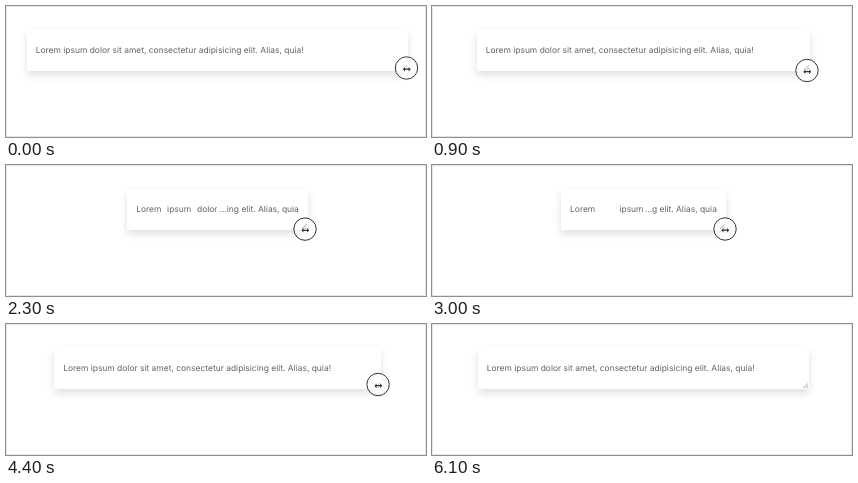
An HTML page for the animation above (6.2 s loop, 420 by 131 pixels).

```html
<!DOCTYPE html>
<html lang="en">
<head>
<meta charset="utf-8">
<title>Middle ellipsis</title>
<style>
  html, body { margin: 0; width: 100%; height: 100%; overflow: hidden; background: #fff; }
  #stage { position: absolute; left: 0; top: 0; width: 420px; height: 131px; overflow: hidden; }
  #stage::after { content: ""; position: absolute; inset: 0; border: 1px solid #e5e5e5; }
  #card {
    position: absolute; top: 24px; height: 41px; box-sizing: border-box; padding: 12px 9px 10px;
    background: #fff; border-radius: 2px; box-shadow: 0 4px 8px rgba(0, 0, 0, .13);
    font: 8.45px/18px Inter, "Open Sans", sans-serif; color: #626262; text-rendering: geometricPrecision;
  }
  #head, #tail { height: 18px; overflow: hidden; }
  #head { width: 50%; float: left; text-align: justify; }
  #tail { width: 50%; float: right; direction: rtl; white-space: nowrap; text-overflow: ellipsis; }
  .full #head { width: 100%; text-align: left; white-space: nowrap; }
  .full #tail { display: none; }
  svg { position: absolute; left: 0; top: 0; }
</style>
</head>
<body>
<div id="stage">
  <div id="card"><div id="head"></div><div id="tail"></div></div>
  <svg width="420" height="131" viewBox="0 0 420 131">
    <circle id="ring" r="11.2" fill="#fff" fill-opacity=".6" stroke="#333" stroke-width="1"/>
    <path id="grip" d="M-5.5 -1L-.8 -5.7M-2.8 -1L-.8 -3" stroke="#777" stroke-width=".7" fill="none"/>
    <path id="resize" d="M-4 0L-1.8 -2.2V-.6H1.8V-2.2L4 0L1.8 2.2V.6H-1.8V2.2Z"
      fill="#333" stroke="#fff" stroke-width=".8" paint-order="stroke"/>
    <path id="arrow" d="M0 0V9L2.1 7.1L3.5 10.3L5 9.6L3.6 6.5H6.4Z"
      fill="#222" stroke="#fff" stroke-width=".7"/>
  </svg>
</div>
<script>
const LOOP = 6200, STEP = 100;
const RELEASE = 5700, LEAVE = 5900, GONE = 6100;
const CENTER = 211.5, FULL_WIDTH = 268, LAG = 30;
const TEXT = "Lorem ipsum dolor sit amet, consectetur adipisicing elit. Alias, quia!";

// Turning points of the pointer: [time, position]
const DRAG_X = [[0, 400.5], [2820, 290], [4300, 374], [5000, 335], [5500, 375.5]];
const DRAG_Y = [[0, 62], [900, 64.5], [3000, 64], [3800, 60], [5000, 61], [5500, 65]];

const el = id => document.getElementById(id);
const mix = (a, b, k) => a + (b - a) * k;
const swing = k => (1 - Math.cos(Math.PI * k)) / 2;
const move = (id, x, y) => el(id).setAttribute("transform", `translate(${x} ${y})`);
const show = (id, on) => el(id).setAttribute("visibility", on ? "visible" : "hidden");

function track(keys, t) {
  const next = keys.findIndex(key => key[0] > t);
  if (next < 0) return keys[keys.length - 1][1];
  if (next === 0) return keys[0][1];
  const [t0, a] = keys[next - 1], [t1, b] = keys[next];
  return mix(a, b, swing((t - t0) / (t1 - t0)));
}

function drawCard(right) {
  const width = 2 * (right - CENTER);
  const card = el("card");
  card.style.left = right - width + "px";
  card.style.width = width + "px";
  card.className = width - 18 >= FULL_WIDTH ? "full" : "";
  move("grip", right - .5, 65);
}

function draw(time) {
  const t = Math.floor(time % LOOP / STEP) * STEP;
  const x = track(DRAG_X, t), y = track(DRAG_Y, t);

  // The card edge trails the pointer slightly
  drawCard(track(DRAG_X, t - LAG) + 1.8);
  move("ring", x, y);
  move("resize", x + .3, y + 1.2);
  const k = (t - LEAVE) / STEP;
  move("arrow", mix(384, 398, k), mix(84, 106, k));

  show("ring", t < RELEASE);
  show("resize", t < LEAVE);
  show("arrow", t >= LEAVE && t < GONE);
}

el("head").textContent = el("tail").textContent = TEXT;
const start = performance.now();
function tick() {
  draw(performance.now() - start);
  requestAnimationFrame(tick);
}
tick();
</script>
</body>
</html>
```
